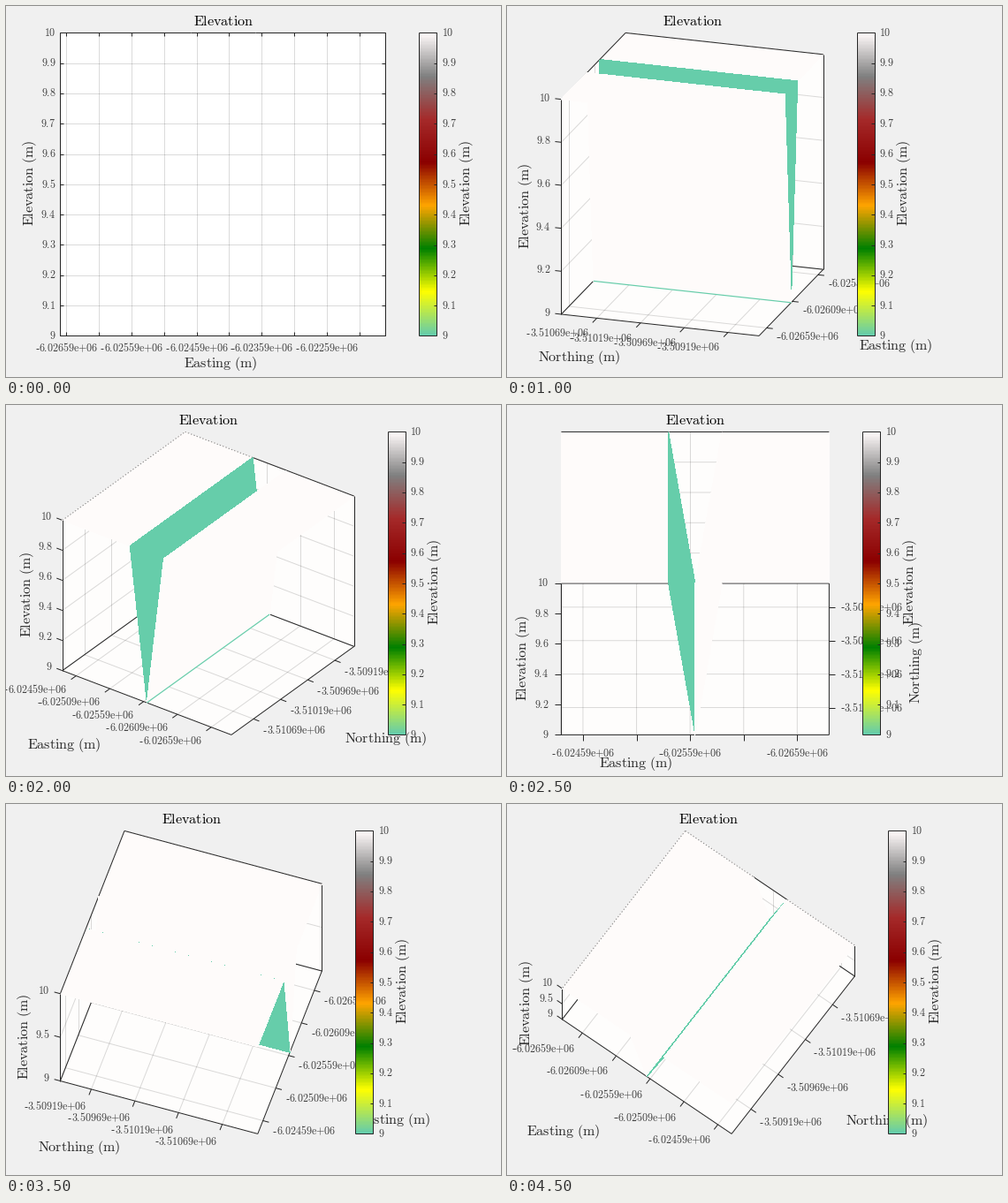
Animation, 560 px wide and 420 px high, one loop 5000 ms. Source, as a matplotlib script:

```python
import numpy as np
import matplotlib.pyplot as plt
from matplotlib.animation import FuncAnimation
from matplotlib.colors import LinearSegmentedColormap

plt.rcParams["mathtext.fontset"] = "cm"

W, H, DPI = 560, 420, 100
PX = 72 / DPI
COUNT, STEP = 10, 500
TOP, BOTTOM = 30.4, 373.4
INK, SOFT, GREEN = "#262626", "#404040", "#66cdaa"
SNOW, WALL = "#fefbfa", "#fefdfc"
GRID = (0, 0, 0, 0.14)
TERRAIN = LinearSegmentedColormap.from_list(
    "terrain_steps",
    [GREEN, "yellow", "green", "orange", "darkred", "brown", "gray", "#fffafa"])

# plot box: left and right side for each view
SIDES = [(61.4, 429.4), (77.4, 418.4), (61.4, 357.8), (115.4, 429.4),
         (63.8, 393.8), (61.4, 364.4), (77.4, 418.4), (61.4, 357.4),
         (115.4, 429.4), (62.4, 393.4)]
# centres of the labels under the left and right floor edges
NAMES_AT = [((243, 405), None), ((46, 394), (407, 397)),
            ((82, 398), (440, 385)), ((33, 379), (393, 396)),
            ((66, 385), (430, 378)), ((146, 406), (463, 291)),
            ((45, 371), (410, 379)), ((83, 389), (439, 358)),
            ((32, 349), (393, 387)), ((64, 371), (430, 359))]
# line style of the upper back edges: along y, along x low part, x high part
RIMS = ["---", "---", "- -", ": :", ":-:", " --", ":::", "---", ":::", ":::"]

fig = plt.figure(figsize=(W / DPI, H / DPI), dpi=DPI, facecolor="#f0f0f0")
ax = fig.add_axes([0, 0, 1, 1])


def unit(d):
    return np.asarray(d) / np.hypot(*d)


def line(p, q, color=INK, z=3, style="-", width=1):
    if style == ":":
        style, color = (0, (1.5, 2)), "#8a8a8a"
    ax.plot([p[0], q[0]], [p[1], q[1]], color=color, lw=width * PX, ls=style,
            zorder=z, solid_capstyle="butt")


def poly(points, color, z):
    ax.fill(*np.transpose(points), color=color, lw=0, zorder=z, antialiased=False)


def text(x, y, s, size=12, color=INK, ha="center", z=6, rot=0):
    s = s.replace(" ", r"\ ").replace("+", "{+}")
    ax.text(x, y, rf"$\mathrm{{{s}}}$", fontsize=size * PX, color=color,
            ha=ha, va="center", rotation=rot, zorder=z)


def metres(x, y, base, i):
    """Negative coordinate label that starts at x."""
    line((x + 0.3, y + 0.6), (x + 3.4, y + 0.6), SOFT, 6)
    text(x + 4, y, f"{base - 0.0005 * i:.5f}e+06", color=SOFT, ha="left")


class View:
    def __init__(self, k):
        az, el = np.radians(-36 * k + 1e-4), np.radians(9 * k)
        self.c, self.s = np.cos(az), np.sin(az)
        self.ce, self.se = np.cos(el), np.sin(el)
        self.left_x, self.right_x = SIDES[k]
        raw = np.array([self.raw(x, y, z) for x in (0, 1)
                        for y in (0, 1) for z in (0, 1)])
        self.lo, self.span = raw.min(0), np.ptp(raw, axis=0)
        ground = [(x, y) for x in (0, 1) for y in (0, 1)]
        across = lambda p: self.raw(*p, 0)[0]
        depth = lambda p: self.depth(*p)
        self.left, self.right = min(ground, key=across), max(ground, key=across)
        self.front, self.back = min(ground, key=depth), max(ground, key=depth)

    def depth(self, x, y):
        return -x * self.s + (1 - y) * self.c

    def raw(self, x, y, z):
        return np.array([x * self.c + (1 - y) * self.s,
                         z * self.ce + self.depth(x, y) * self.se])

    def __call__(self, x, y, z):
        u, v = (self.raw(x, y, z) - self.lo) / self.span
        return np.array([self.left_x + u * (self.right_x - self.left_x),
                         BOTTOM - v * (BOTTOM - TOP)])


def ticks(k):
    start, step = (0.019, 0.1) if k == 0 else (0.119, 0.4 if k in (2, 3) else 0.2)
    z_step = 0.1 if k == 0 else 0.2 if k < 6 else 0.5
    return (np.arange(start, 1, step), 0.18 + 0.221 * np.arange(4),
            np.arange(0, 1.001, z_step))


def draw_box(k, v, xs, ys, zs):
    bx, by = v.back
    fill = WALL if k else "white"
    floor = [v(*p, 0) for p in (v.left, v.front, v.right, v.back)]
    poly(floor, fill, 1)
    for p in (v.left, v.right):
        poly([v(*p, 0), v(*p, 1), v(*v.back, 1), v(*v.back, 0)], fill, 1)
    for x in xs:
        if k:
            line(v(x, 0, 0), v(x, 1, 0), GRID, 2)
        line(v(x, by, 0), v(x, by, 1), GRID, 2)
    if k:
        for y in ys:
            line(v(0, y, 0), v(1, y, 0), GRID, 2)
            if k != 5:
                line(v(bx, y, 0), v(bx, y, 1), GRID, 2)
    for z in zs:
        line(v(0, by, z), v(1, by, z), GRID, 2)
        if k not in (0, 5):
            line(v(bx, 0, z), v(bx, 1, z), GRID, 2)
    for p, q in zip(floor, floor[1:] + floor[:1]):
        line(p, q)
    line(v(*v.left, 0), v(*v.left, 1))
    if k != 5:
        line(v(*v.right, 0), v(*v.right, 1))


def draw_surface(k, v):
    """Flat ground with one V-shaped trench along y."""
    if k:
        xs, zs = [0, 0.4, 0.5, 0.6, 1], [1, 1, 0, 1, 1]
        order = sorted(range(4), key=lambda i: -v.depth((xs[i] + xs[i + 1]) / 2, 0))
        for n, i in enumerate(order):
            a, b = (xs[i], zs[i]), (xs[i + 1], zs[i + 1])
            quad = [v(x, y, z) for (x, z), y in ((a, 0), (a, 1), (b, 1), (b, 0))]
            poly(quad, GREEN if i == 2 else SNOW, 4 + n / 10)
        if k < 5:
            line(v(0.5, 0, 0), v(0.5, 1, 0), GREEN, 4.25, width=1.2)
    bx, by = v.back
    along_y, low, high = RIMS[k]
    parts = [((bx, 0), (bx, 1), along_y), ((0, by), (0.4, by), low),
             ((0.4, by), (0.6, by), "-"), ((0.6, by), (1, by), high)]
    for p, q, style in parts:
        if style != " ":
            z = 4.05 if p[0] == 0.4 else 5
            line(v(*p, 1), v(*q, 1), style=style, z=z)
    if k == 5:
        for a, b in ((0, 0.4), (0.6, 1)):
            line(v(a, 0, 1), v(b, 0, 1), "#808080", 5)


def flat_ticks(v, xs, zs):
    l, r = SIDES[0]
    for i, x in enumerate(xs):
        px = v(x, 1, 0)[0]
        line((px, BOTTOM), (px, BOTTOM - 4))
        line((px, TOP), (px, TOP + 4))
        if i % 2 == 0:
            metres(px - 35, 387, 6.02659, i)
    for z in zs:
        py = v(0, 1, z)[1]
        line((l, py), (l + 4, py))
        line((r, py), (r - 4, py))
        text(l - 5, py, f"{9 + z:g}", color=SOFT, ha="right")


def edge_ticks(k, p, q, out, side, v, xs, ys):
    """Ticks and labels of the floor edge from p to q."""
    is_x = p[1] == q[1]
    vals, base = (xs, 6.02659) if is_x else (ys, 3.51069)
    for i, t in enumerate(vals):
        at = v(t, p[1], 0) if is_x else v(p[0], t, 0)
        line(at, at + 7 * out)
        x, y = at + 11.5 * out
        if k != 5:
            metres(x if side > 0 else x - 72, y + 8.5, base, i)
        elif not is_x:
            metres(at[0] + 13, at[1], base, i)
        elif i % 2 == 0:
            metres(at[0] - 35, at[1] + 21, base, i)
    return "Easting (m)" if is_x else "Northing (m)"


def draw_axes(k, v, xs, ys, zs):
    l, r = SIDES[k]
    mid = (v(*v.left, 0) + v(*v.left, 1)) / 2
    text((l + r) / 2 + 0.5, 17, "Elevation", 16, "black")
    gap = 34 if k == 0 else 43 if k == 5 else 40
    text(l - gap, mid[1] - 1, "Elevation (m)", 16, rot=90)
    at_left, at_right = NAMES_AT[k]
    if k == 0:
        flat_ticks(v, xs, zs)
        text(*at_left, "Easting (m)", 16)
        return
    left, front, right = (v(*p, 0) for p in (v.left, v.front, v.right))
    u, w = unit(front - left), unit(front - right)
    for z in zs:
        p = v(*v.left, z)
        line(p, p - 7 * u)
        x, y = p - (14 if k == 5 else 12) * u
        text(x, y, f"{9 + z:g}", color=SOFT, ha="right")
    name = edge_ticks(k, v.left, v.front, w, -1, v, xs, ys)
    text(*at_left, name, 16)
    name = edge_ticks(k, v.front, v.right, u, 1, v, xs, ys)
    text(*at_right, name, 16, rot=90 if k == 5 else 0)


def draw_bar(k):
    x = SIDES[k][1] + 38
    ramp = np.linspace(1, 0, 343)[:, None]
    ax.imshow(ramp, cmap=TERRAIN, extent=(x, x + 20, BOTTOM, TOP), aspect="auto",
              interpolation="nearest", zorder=8)
    box = [(x, TOP), (x + 20, TOP), (x + 20, BOTTOM), (x, BOTTOM)]
    for p, q in zip(box, box[1:] + box[:1]):
        line(p, q, z=9)
    for i in range(11):
        y = BOTTOM - i * (BOTTOM - TOP) / 10
        line((x + 16.5, y), (x + 20, y), z=9)
        text(x + 25.5, y, f"{9 + i / 10:g}", color=SOFT, ha="left", z=9)
    text(x + 53.6, 200, "Elevation (m)", 16, z=9, rot=90)


def update(k):
    ax.clear()
    v = View(k)
    xs, ys, zs = ticks(k)
    draw_box(k, v, xs, ys, zs)
    draw_surface(k, v)
    draw_axes(k, v, xs, ys, zs)
    draw_bar(k)
    ax.set_xlim(0, W)
    ax.set_ylim(H, 0)
    ax.axis("off")
    return []


anim = FuncAnimation(fig, update, frames=COUNT, interval=STEP, repeat=True,
                     repeat_delay=0, init_func=lambda: update(0))
plt.show()
```
